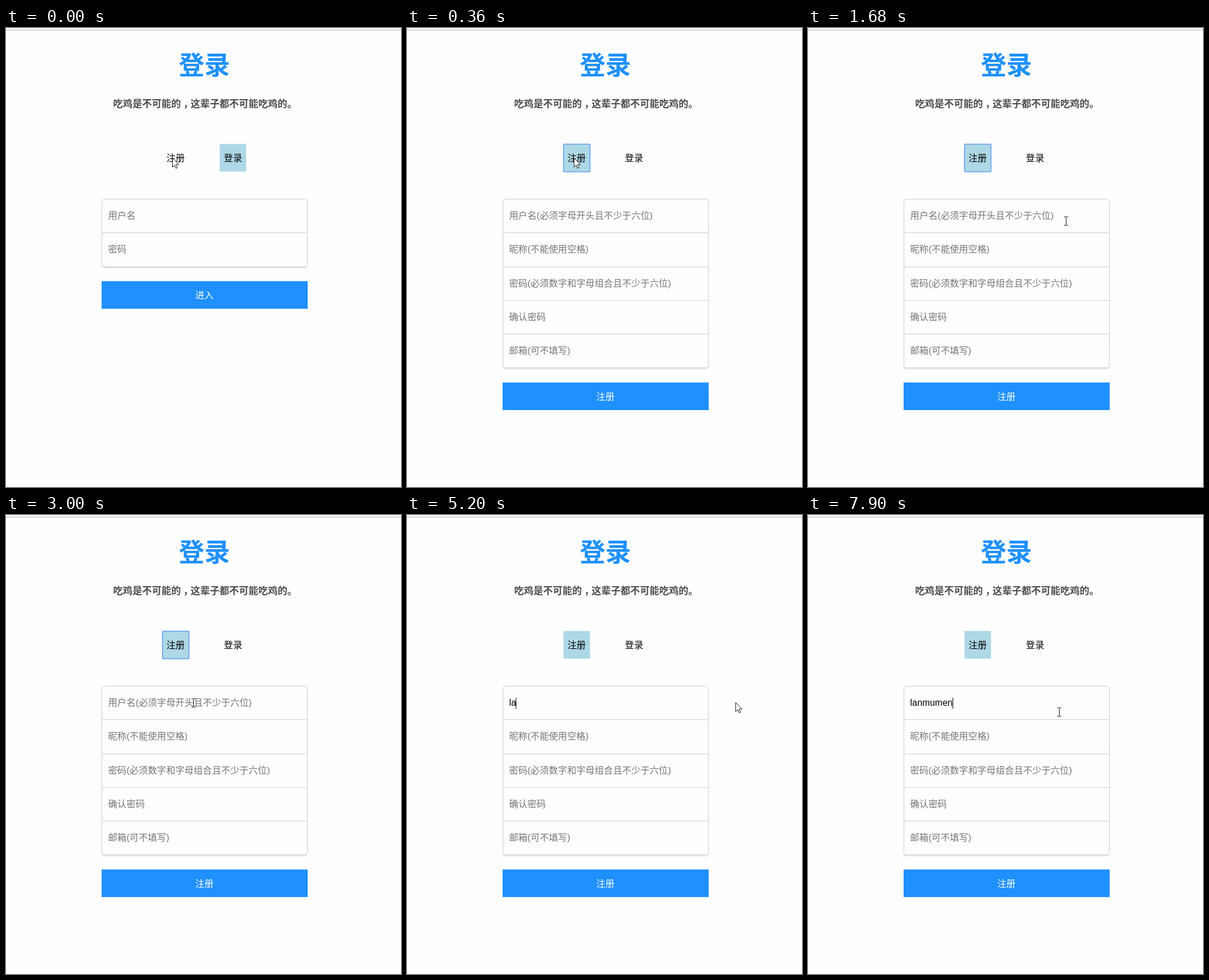
An HTML page for the animation above (8 s loop, 694 px wide and 806 px high).

```html
<!DOCTYPE html>
<html lang="zh-CN">
<head>
<meta charset="utf-8">
<title>登录</title>
<style>
  html, body { margin: 0; width: 100%; height: 100%; overflow: hidden; background: #fefefe; }
  svg { display: block; width: 694px; height: 806px; }
  text { font: 16.1px "Liberation Sans", "Noto Sans CJK SC", "Noto Sans CJK", sans-serif; white-space: pre; }
  .title { font-size: 45px; font-weight: 700; fill: #1e90ff; }
  .slogan { font-size: 17px; font-weight: 700; fill: #4c4c4c; }
  .hint { fill: #757575; }
  .line { stroke: #ccc; fill: none; }
  #typed { font-size: 16px; }
</style>
</head>
<body>
<svg viewBox="0 0 694 806">
  <rect width="694" height="806" fill="#fefefe"/>
  <rect y="3" width="694" height="1" fill="#b4b4b4"/>
  <text class="title" x="303.5" y="81.5">登录</text>
  <text class="slogan" x="188.2" y="139">吃鸡是不可能的<tspan dx="4">，</tspan><tspan dx="-4">这辈子都不可能吃鸡的。</tspan></text>
  <rect id="tab" y="203.7" width="46.5" height="48.3" fill="#add8e6"/>
  <rect id="ring" x="275" y="204" width="46.5" height="48.5" rx="1" fill="none" stroke="#64a0f0" stroke-width="1.6"/>
  <text x="282" y="234">注册</text>
  <text x="382.8" y="234">登录</text>
  <g id="login"></g>
  <g id="signup"></g>
  <text id="typed" x="179.5" y="335"></text>
  <rect id="caret" y="321" width="1" height="19"/>
  <path id="arrow" d="M.5 .5V16.2L4.2 12.8L6.6 18.4L9 17.4L6.6 11.9H11.6Z" fill="#fff" stroke="#1a1a1a"/>
  <path id="beam" d="M-3 -7.5H0M1 -7.5H4M-3 7.5H0M1 7.5H4M.5 -7V7" fill="none" stroke="#111"/>
</svg>
<script>
const LOOP = 8000, STEP = 120, BLINK = 500;
const PRESS = 240, SWITCH = 360, FOCUS = 3340;
const USER = "lanmumen";

const linear = u => u;
const easeOut = u => 1 - (1 - u) ** 2.1;
const easeInOut = u => u < 0.5 ? 2 * u * u : 1 - 2 * (1 - u) ** 2;

// pointer strokes: each bends from the previous end towards a control point
const HOME = [292, 228];
const STROKES = [
  { from: 0, to: 360, ease: linear, bend: [293, 228], end: [293, 228] },
  { from: 360, to: 1680, ease: easeInOut, bend: [390, 430], end: [453, 339] },
  { from: 1680, to: 2520, ease: linear, bend: [508, 326], end: [412, 328] },
  { from: 2520, to: 3360, ease: easeOut, bend: [362, 331], end: [312, 329] },
  { from: 3360, to: 3600, ease: linear, bend: [445, 329], end: [577, 329] },
  { from: 7660, to: 7900, ease: linear, bend: [520, 312], end: [441, 346] }
];

// [start, letters]: one letter per step; a burst of none only restarts the blink
const BURSTS = [[FOCUS, 0], [4960, 1], [5200, 1], [5320, 0], [5820, 3], [6430, 3]];

const $ = id => document.getElementById(id);
const show = (el, on) => el.setAttribute("visibility", on ? "inherit" : "hidden");
const clamp = (v, lo, hi) => Math.min(hi, Math.max(lo, v));

function add(parent, tag, attrs, label) {
  const el = document.createElementNS("http://www.w3.org/2000/svg", tag);
  for (const key in attrs) el.setAttribute(key, attrs[key]);
  if (label) el.textContent = label;
  return parent.appendChild(el);
}

function buildForm(group, hints, bottom, action) {
  add(group, "rect", { class: "line", x: 168.5, y: 300.5, width: 361, height: bottom - 300, rx: 5 });
  const labels = hints.map((hint, i) => {
    const lineY = Math.round(359.3 + 59.25 * i) + 0.5;
    add(group, "path", { class: "line", d: `M169 ${lineY}H528` });
    return add(group, "text", { class: "hint", x: 179.5, y: Math.round(335.2 + 59.2 * i) }, hint);
  });
  add(group, "rect", { x: 168, y: bottom + 24.5, width: 362, height: 48.4, fill: "#1e90ff" });
  add(group, "text", { x: 348.5, y: bottom + 55, "text-anchor": "middle", fill: "#fff" }, action);
  return labels;
}

buildForm($("login"), ["用户名", "密码"], 420, "进入");
const userHint = buildForm($("signup"), [
  "用户名(必须字母开头且不少于六位)",
  "昵称(不能使用空格)",
  "密码(必须数字和字母组合且不少于六位)",
  "确认密码",
  "邮箱(可不填写)"
], 598, "注册")[0];

function pointerAt(t) {
  const i = STROKES.findLastIndex(s => s.from <= t);
  const { from, to, ease, bend, end } = STROKES[i];
  const start = i ? STROKES[i - 1].end : HOME;
  const p = ease(clamp((t - from) / (to - from), 0, 1)), q = 1 - p;
  return start.map((v, k) => Math.round(q * q * v + 2 * p * q * bend[k] + p * p * end[k]));
}

function drawPointer(t) {
  // positions refresh every step, with a later phase after the idle spell
  const phase = t < 3840 ? 0 : 100;
  const [x, y] = pointerAt(Math.floor((t - phase) / STEP) * STEP + phase);
  const overField = x > 169 && x < 529 && y > 301;
  for (const id of ["arrow", "beam"]) {
    show($(id), overField === (id === "beam"));
    $(id).setAttribute("transform", `translate(${x} ${y})`);
  }
}

function drawInput(t) {
  let count = 0, lastKey = 0;
  for (const [start, letters] of BURSTS) {
    if (t < start) break;
    const typed = Math.min(letters, Math.floor((t - start) / STEP) + 1);
    count += typed;
    lastKey = start + Math.max(0, typed - 1) * STEP;
  }
  $("typed").textContent = USER.slice(0, count);
  show(userHint, count === 0);
  show($("caret"), t >= FOCUS && Math.floor((t - lastKey) / BLINK) % 2 === 0);
  const width = count ? $("typed").getComputedTextLength() : 0;
  $("caret").setAttribute("x", Math.max(180, Math.floor(179.4 + width)));
}

function draw(t) {
  const signup = t >= SWITCH;
  show($("login"), !signup);
  show($("signup"), signup);
  $("tab").setAttribute("x", signup ? 275 : 375.5);
  show($("ring"), t >= PRESS && t < FOCUS);
  drawInput(t);
  drawPointer(t);
}

const start = performance.now();
function tick() {
  draw((performance.now() - start) % LOOP);
  requestAnimationFrame(tick);
}
tick();
</script>
</body>
</html>
```
